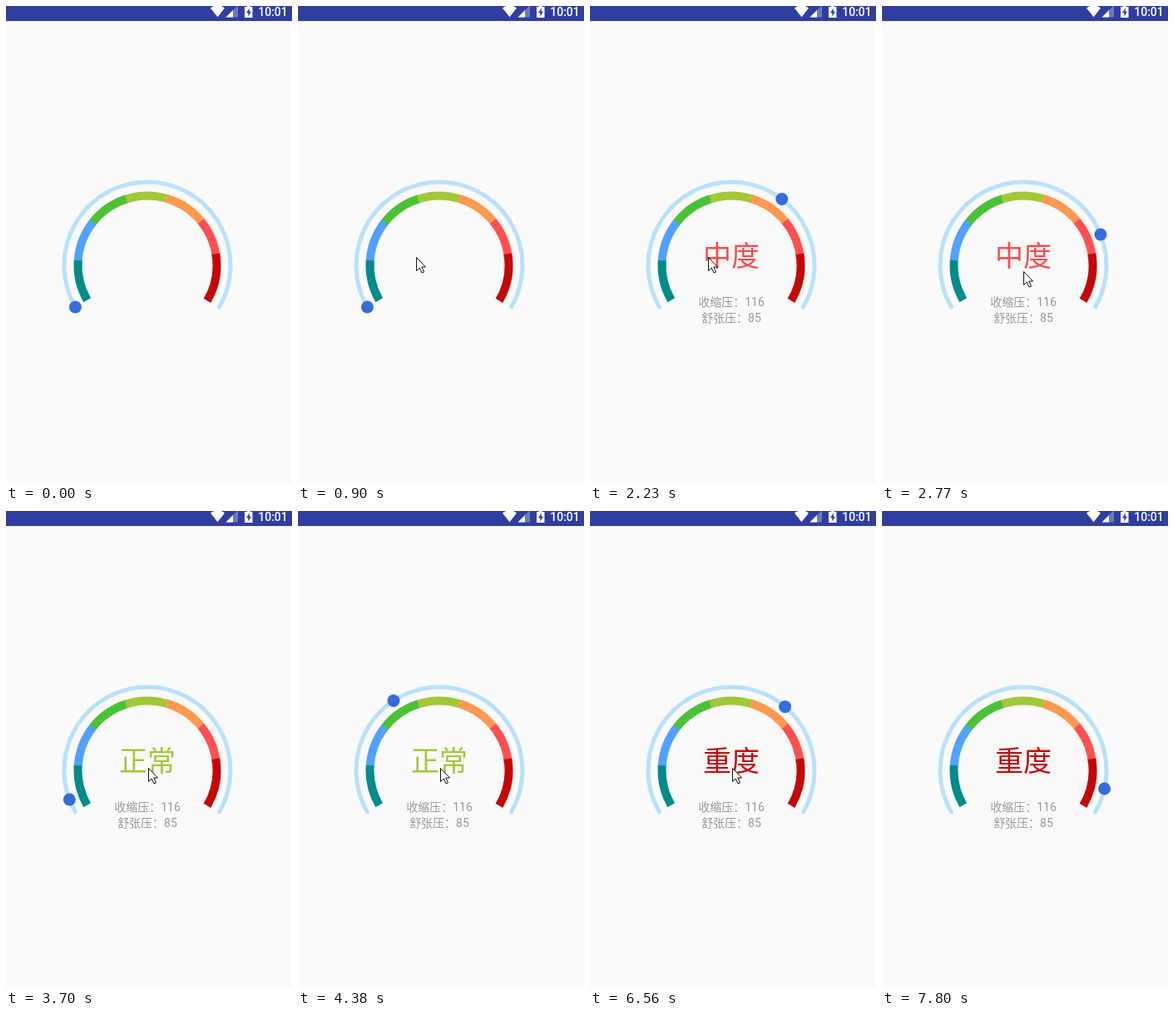
An HTML page that plays this animation: 344 px wide and 572 px high, repeating every 8.12 s.

```html
<!DOCTYPE html>
<html lang="zh-CN">
<head>
<meta charset="utf-8">
<title>Gauge</title>
<style>
  html, body { margin: 0; width: 100%; height: 100%; overflow: hidden; background: #fafafa; }
  svg { display: block; width: 344px; height: 572px; }
  text { font-family: Roboto, "Noto Sans CJK SC", "Noto Sans CJK", sans-serif; text-anchor: middle; }
</style>
</head>
<body>
<svg viewBox="0 0 344 572">
  <rect width="344" height="572" fill="#fafafa"/>
  <rect width="344" height="18" fill="#303f9f"/>
  <g fill="#fff">
    <path d="M246 2.5Q254.500 -4 263 2.500L254.500 13.300Z"/>
    <path d="M264.500 13.500H279V-1Z" opacity=".3"/>
    <path d="M264.500 13.500H273V5Z"/>
    <path d="M287 1H290V-1H293.500V1H296.500V14H287Z"/>
    <path d="M292.800 2.500L289 8.200H291.300V12.500L295 6.800H292.800Z" fill="#303f9f"/>
    <text x="321" y="12" font-size="14" font-weight="500">10:01</text>
  </g>
  <g id="arcs" fill="none"></g>
  <g id="labels" fill="#999" font-size="14">
    <text id="level" x="170" y="311.500" font-size="34"></text>
    <text x="170" y="360">收缩压：116</text>
    <text x="170" y="379">舒张压：85</text>
  </g>
  <circle id="knob" r="7.500" fill="#366cd9"/>
  <path id="cursor" d="M.5.500V16.500L4.200 13L7 19L9.500 18L6.800 12H11.500Z" fill="#fff" stroke="#111" stroke-linejoin="round"/>
</svg>
<script>
const LOOP = 8120, TICK = 77.45, FIRST_TICK = 210, SWEEP_TIME = 1500;
const CX = 170, CY = 311, TRACK_RADIUS = 100, START_ANGLE = 150;
const COLORS = ['#008c89', '#51a1ff', '#4bc235', '#a2c737', '#ff9850', '#ff5050', '#c40808'];

const runs = [
  { start: 1122, end: 338.3, label: '中度', color: '#ff4b4b' },
  { start: 3423, end: 270, label: '正常', color: '#a2c737' },
  { start: 5594, end: 372.7, label: '重度', color: '#c40808' },
];

// Pointer path: tick, x, y
const pointerPath = [
  [0, 244, 555], [1, 262, 470], [2, 276, 380], [3, 283, 310], [4, 280, 278],
  [5, 280, 278], [9, 142, 301], [31, 142, 301], [32, 156, 321], [33, 170, 318],
  [35, 186, 316], [36, 186, 316], [38, 171, 308], [93, 171, 308],
  [94, 195, 340], [95, 235, 405], [96, 280, 475], [97, 318, 545],
];

const $ = id => document.getElementById(id);

function polar(angle, radius) {
  const a = angle * Math.PI / 180;
  return [CX + radius * Math.cos(a), CY + radius * Math.sin(a)];
}

function arc(from, to, radius, color, width, cap = 'butt') {
  const large = to - from > 180 ? 1 : 0;
  return `<path d="M${polar(from, radius)}A${radius} ${radius} 0 ${large} 1 ${polar(to, radius)}"
    stroke="${color}" stroke-width="${width}" stroke-linecap="${cap}"/>`;
}

function place(element, [x, y]) {
  element.setAttribute('transform', `translate(${x} ${y})`);
}

function pointerAt(tick) {
  const i = pointerPath.findIndex(key => key[0] >= tick);
  const [t1, x1, y1] = pointerPath[i];
  const [t0, x0, y0] = pointerPath[Math.max(0, i - 1)];
  const p = t1 > t0 ? (tick - t0) / (t1 - t0) : 0;
  return [x0 + (x1 - x0) * p, y0 + (y1 - y0) * p];
}

function render(time) {
  // The screen refreshes in even steps.
  const tick = Math.floor((time - FIRST_TICK + 15) / TICK);
  const now = FIRST_TICK + tick * TICK;

  const run = runs.filter(r => r.start <= now).pop();
  let angle = START_ANGLE;
  if (run) {
    const p = Math.min(1, (now - run.start) / SWEEP_TIME);
    angle += (run.end - START_ANGLE) * (1 - Math.cos(Math.PI * p)) / 2;
    $('level').textContent = run.label;
    $('level').setAttribute('fill', run.color);
  }
  $('labels').style.display = run ? '' : 'none';
  place($('knob'), polar(angle, TRACK_RADIUS));

  const pointerVisible = tick >= 0 && tick <= 97;
  $('cursor').style.display = pointerVisible ? '' : 'none';
  if (pointerVisible) place($('cursor'), pointerAt(tick));
}

$('arcs').innerHTML = arc(START_ANGLE, 390, TRACK_RADIUS, '#b9e1fb', 5, 'round') +
  COLORS.map((color, i) => {
    const from = i === 6 ? 350.5 : START_ANGLE + 34.1 * i;
    return arc(from, i === 6 ? 390.5 : from + 34.3, 83.5, color, 10);
  }).join('');

const origin = performance.now();
function frame() {
  render((performance.now() - origin) % LOOP);
  requestAnimationFrame(frame);
}
frame();
</script>
</body>
</html>
```
